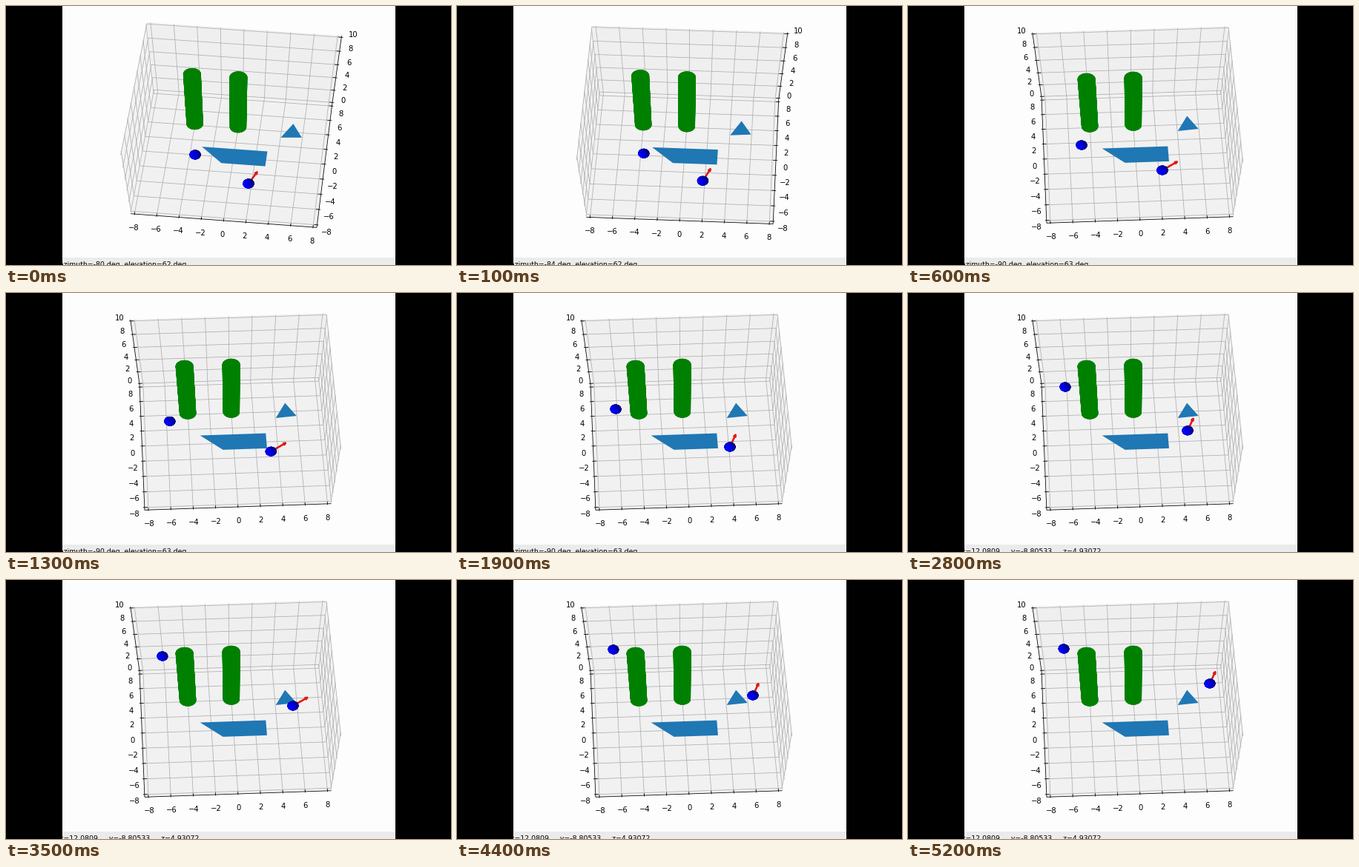
A matplotlib script that plays this animation: 600x350 px, repeating every 5.3 s.

```python
import numpy as np
import matplotlib.pyplot as plt
from matplotlib.animation import FuncAnimation
from matplotlib.collections import LineCollection, PolyCollection
from matplotlib.patches import FancyArrowPatch, Polygon, Rectangle

W, H, DPI = 600, 350, 100
FRAMES, STEP = 53, 100
PX = 72 / DPI                     # points per pixel

# Perspective camera ten cube widths away, in screen pixels
CX, CY, SX, SY, DIST = 306.7, 163.6, 2479, 1859, 10
CENTER, SIZE = np.array([0, 0, 5]), np.array([16, 16, 10])

EDGE = 8 + 16 / 48                # panes reach a little past the limits
Z0, Z1 = -10 / 48, 10 + 10 / 48
TICKS, ZTICKS = range(-8, 9, 2), range(0, 11, 2)
PAD, ZPAD = 0.912, 0.57           # tick label offsets
TICK_OUT, TICK_IN = 0.133, 0.267

AZIM = [-83.9, -87, -90, -92.8]
ELEV = [63.5, 64, 64.5, 65]
DRAG_TEXT = [(-80, 62), (-84, 62), (-87, 63), (-90, 63)]
HOVER_FRAME = 22
HOVER_TEXT = (" " * 5).join(["x=12.0809", "y=-8.80533", "z=4.93072"])

BLUE, GREEN, RED = "#1f77b4", "#008000", "#e01a14"
QUAD = [(-1, -1), (3, -1), (3, 1), (-3, 1)]
TRIANGLE = [(4.03, 3), (5.95, 3.2), (5, 5)]
POSTS = [(-4, 4), (0, 4)]
POST_RADIUS, POST_HEIGHT, BALL_RADIUS = 0.75, 8, 0.5

# Paths on the floor: frame, x, y
ROBOT = np.array([
    (0, 1.73, -3.45), (5, 2.2, -2.25), (6, 2.33, -2.15), (18, 4.05, -0.92),
    (19, 4.09, -0.87), (28, 4.83, 1.27), (34, 5.4, 2.67), (35, 5.6, 2.82),
    (38, 5.95, 3.1), (44, 6.51, 4.18), (52, 7.16, 5.77)])
DRIFTER = np.array([
    (0, -3.49, -0.14), (6, -4.85, 1.54), (12, -5.62, 2.76), (19, -6.1, 4.7),
    (28, -6.14, 7.74), (35, -6.13, 10.21), (36, -6.13, 10.3),
    (42, -6.1, 11.05), (44, -6.1, 11.14), (52, -6.16, 11.25)])
SHALLOW, STEEP, ARROW = np.radians(37), np.radians(69), 1.95


def camera(azim, elev):
    a, e = np.radians([azim, elev])
    right = np.array([-np.sin(a), np.cos(a), 0])
    up = np.array([-np.sin(e) * np.cos(a), -np.sin(e) * np.sin(a), np.cos(e)])
    toward = np.array([np.cos(e) * np.cos(a), np.cos(e) * np.sin(a), np.sin(e)])
    return right, up, toward


def project(points, cam):
    right, up, toward = cam
    q = (np.asarray(points, float) - CENTER) / SIZE
    depth = DIST - q @ toward
    xy = np.stack([CX + SX * (q @ right) / depth,
                   CY - SY * (q @ up) / depth], axis=-1)
    return xy, depth


def on_floor(points):
    return [(x, y, 0) for x, y in points]


def along(path, i):
    return np.array([np.interp(i, path[:, 0], path[:, k]) for k in (1, 2)])


def sphere_mesh(n=20, m=12):
    u = np.linspace(0, 2 * np.pi, n + 1)
    v = np.linspace(0, np.pi, m + 1)

    def at(a, b):
        return np.array([np.cos(a) * np.sin(b), np.sin(a) * np.sin(b), np.cos(b)])

    quads = np.array([[at(u[j], v[k]), at(u[j + 1], v[k]),
                       at(u[j + 1], v[k + 1]), at(u[j], v[k + 1])]
                      for j in range(n) for k in range(m)])
    shade = quads.mean(axis=1) @ np.array([-1, -1, 0.5])
    shade = (shade - shade.min()) / np.ptp(shade)
    colors = np.zeros((len(quads), 3))
    colors[:, 2] = 0.25 + 0.75 * shade
    return quads, colors


BALL, BALL_COLORS = sphere_mesh()

fig = plt.figure(figsize=(W / DPI, H / DPI), dpi=DPI, facecolor="#fdfdfd")
ax = fig.add_axes([0, 0, 1, 1])


def lines(segments, cam, color, width, z):
    ax.add_collection(LineCollection([project(s, cam)[0] for s in segments],
                                     colors=color, linewidths=width * PX, zorder=z),
                      autolim=False)


def face(points, cam, color, z):
    ax.add_patch(Polygon(project(points, cam)[0], facecolor=color,
                         edgecolor="none", zorder=z))


def tick_label(point, value, cam):
    x, y = project(point, cam)[0]
    ax.text(x, y + 0.3, str(value).replace("-", "\u2212"), ha="center", va="top",
            family="DejaVu Sans", size=10 * PX, zorder=5)


def draw_box(cam, wall):
    """wall is the sign of the visible side pane; the axes sit opposite."""
    w, s = wall * EDGE, -wall * EDGE
    face([(-EDGE, EDGE, Z0), (EDGE, EDGE, Z0), (EDGE, EDGE, Z1), (-EDGE, EDGE, Z1)],
         cam, "#efefef", 1)
    face([(w, -EDGE, Z0), (w, EDGE, Z0), (w, EDGE, Z1), (w, -EDGE, Z1)],
         cam, "#f3f3f3", 1)
    face([(-EDGE, -EDGE, Z0), (EDGE, -EDGE, Z0), (EDGE, EDGE, Z0), (-EDGE, EDGE, Z0)],
         cam, "#f1f1f1", 1)

    grid = [[(t, -EDGE, Z0), (t, EDGE, Z0), (t, EDGE, Z1)] for t in TICKS]
    grid += [[(s, t, Z0), (w, t, Z0), (w, t, Z1)] for t in TICKS]
    grid += [[(s, EDGE, t), (w, EDGE, t), (w, -EDGE, t)] for t in ZTICKS]
    lines(grid, cam, "#b0b0b0", 0.8, 2)

    out, inn = s - wall * TICK_OUT, s + wall * TICK_IN
    marks = [[(-EDGE, -EDGE, Z0), (EDGE, -EDGE, Z0)],
             [(s, -EDGE, Z0), (s, EDGE, Z0)],
             [(s, EDGE, Z0), (s, EDGE, Z1)]]
    marks += [[(t, -EDGE - TICK_OUT, Z0), (t, -EDGE + TICK_IN, Z0)] for t in TICKS]
    marks += [[(out, t, Z0), (inn, t, Z0)] for t in TICKS]
    marks += [[(out, EDGE, t), (inn, EDGE, t)] for t in ZTICKS]
    lines(marks, cam, "black", 0.8, 3)

    for t in TICKS:
        tick_label((t, -EDGE - PAD, Z0 - ZPAD), t, cam)
        tick_label((s - wall * PAD, t, Z0 - ZPAD), t, cam)
    for t in ZTICKS:
        tick_label((s - wall * PAD, EDGE + PAD, t), t, cam)


def draw_post(x, y, cam):
    a = np.linspace(0, 2 * np.pi, 41)
    cx, cy = x + POST_RADIUS * np.cos(a), y + POST_RADIUS * np.sin(a)
    low = project(np.c_[cx, cy, 0 * a], cam)[0]
    high = project(np.c_[cx, cy, 0 * a + POST_HEIGHT], cam)[0]
    sides = [[low[k], low[k + 1], high[k + 1], high[k]] for k in range(40)]
    ax.add_collection(PolyCollection(sides + [low, high], facecolors=GREEN,
                                     edgecolors=GREEN, linewidths=0.3, zorder=7),
                      autolim=False)


def draw_ball(pos, cam):
    xy, depth = project(BALL * BALL_RADIUS + np.array([*pos, 0]), cam)
    order = np.argsort(-depth.mean(axis=1))
    colors = BALL_COLORS[order]
    ax.add_collection(PolyCollection(xy[order], facecolors=colors, edgecolors=colors,
                                     linewidths=0.3, zorder=9), autolim=False)


def draw_arrow(pos, i, cam):
    shallow = 5 <= i <= 18 or 35 <= i <= 38
    a = SHALLOW if shallow else STEEP
    tip = pos + ARROW * np.array([np.cos(a), np.sin(a)])
    start, end = project(on_floor([pos, tip]), cam)[0]
    ax.add_patch(FancyArrowPatch(start, end, arrowstyle="-|>", mutation_scale=6 * PX,
                                 shrinkA=0, shrinkB=0, color=RED,
                                 linewidth=2.6 * PX, zorder=8))


def draw_frame(i):
    ax.clear()
    ax.set_axis_off()
    ax.set(xlim=(0, W), ylim=(H, 0))

    k = min(i, len(AZIM) - 1)
    cam = camera(AZIM[k], ELEV[k])
    draw_box(cam, 1 if AZIM[k] <= -90 else -1)
    face(on_floor(QUAD), cam, BLUE, 6)
    face(on_floor(TRIANGLE), cam, BLUE, 6)
    for x, y in POSTS:
        draw_post(x, y, cam)
    robot = along(ROBOT, i)
    draw_arrow(robot, i, cam)
    draw_ball(robot, cam)
    draw_ball(along(DRIFTER, i), cam)

    # Status bar, then the black side bands
    ax.add_patch(Rectangle((0, 340), W, 10, color="#ebebeb", lw=0, zorder=10))
    status = HOVER_TEXT
    if i < HOVER_FRAME:
        status = "azimuth={} deg, elevation={} deg".format(*DRAG_TEXT[k])
    ax.text(72.5, 351.7, status, family="DejaVu Sans", size=9.4 * PX,
            va="baseline", zorder=11)
    for x in (0, 524.5):
        ax.add_patch(Rectangle((x, 0), 75.5, H, color="black", lw=0, zorder=12))
    return []


anim = FuncAnimation(fig, draw_frame, frames=FRAMES, interval=STEP,
                     repeat=True, repeat_delay=0)
plt.show()
```
